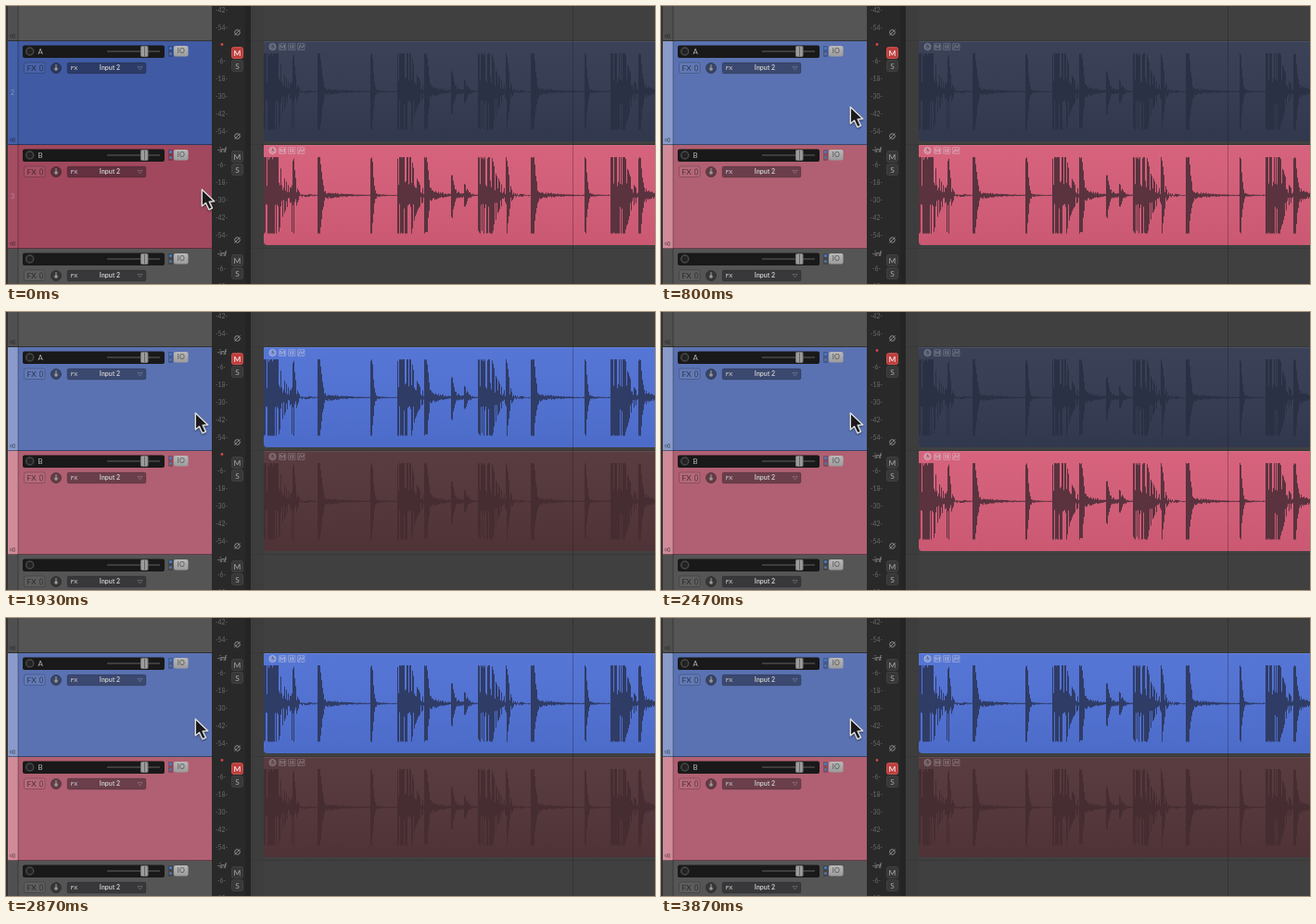
Animation, 700 px wide and 300 px high, one loop 4070 ms. Source, as an HTML page with a canvas:

```html
<!DOCTYPE html>
<html lang="en">
<head>
<meta charset="utf-8">
<title>Track mute toggle</title>
<style>
  html, body { margin: 0; width: 100%; height: 100%; overflow: hidden; background: #404040; }
  canvas { display: block; width: 700px; height: 300px; }
</style>
</head>
<body>
<canvas id="stage" width="700" height="300"></canvas>
<script>
const ctx = document.getElementById('stage').getContext('2d');
const LOOP = 4070;
const ROW = 112;

// time, item heard, muted button lit
const STATES = [
  [0, 'B', 'A'], [1930, 'A', 'A'], [2000, 'A', 'B'], [2470, 'B', 'A'],
  [2870, 'A', 'B'], [3400, 'B', 'A'], [3870, 'A', 'B']
];

const TRACKS = [
  { name: '', top: -74, body: '#555555', strip: '#505050' },
  { name: 'A', num: '2', top: 38, selectAt: 730,
    body: '#405ba3', strip: '#4460a8', bodyOn: '#5a72b2', stripOn: '#8a9bcb',
    item: '#5071d4', wave: '#2f3c66', itemOff: '#343b51', waveOff: '#2b3145' },
  { name: 'B', num: '3', top: 150, selectAt: 200,
    body: '#a1485e', strip: '#a54e63', bodyOn: '#b06072', stripOn: '#d08b99',
    item: '#d55d78', wave: '#5a333f', itemOff: '#533539', waveOff: '#462d31' },
  { name: '', top: 262, body: '#555555', strip: '#505050' }
];

// offset in the bar, hold, decay, height, dense (low swings with gaps)
const HITS = [
  [0, 15, 8, 42, 1], [0, 10, 16, 14, 1], [30, 2, 2.5, 40, 1],
  [57.5, 3, 2.6, 47, 0], [57.5, 2, 24, 6, 0],
  [115, 1.5, 1.8, 46, 0], [115, 1, 10, 4, 0],
  [143.5, 15, 7, 44, 1], [143.5, 15, 14, 12, 1],
  [173, 2.5, 2.6, 46, 0], [173, 3, 13, 11, 0],
  [201.5, 1.5, 3.2, 24, 0], [201.5, 1, 12, 7, 0], [215.5, 1.5, 4, 13, 0]
];
const BAR = 230.5;
const CLIP = 41.2;

function noise(n) {
  const v = Math.sin(n * 127.1 + 11.7) * 43758.5453;
  return v - Math.floor(v);
}

function waveColumn(px) {
  const pos = px % BAR;
  let best = 0.7, dense = 0, age = 0;
  for (const [start, hold, decay, height, gaps] of HITS) {
    const d = pos - start;
    if (d < 0) continue;
    const level = height * Math.exp(-Math.max(0, d - hold) / decay);
    if (level > best) { best = level; dense = gaps; age = d; }
  }
  const gapChance = 0.15 + 0.4 * Math.min(1, age / 24);
  const swing = seed => {
    const r = noise(px + seed);
    if (dense) return best * (r < gapChance ? 0.2 + 0.5 * r : 0.85 + 0.25 * r);
    return best * (best < 12 ? 0.4 + 0.6 * r : 0.85 + 0.2 * r);
  };
  return [Math.min(CLIP, swing(0)), Math.min(CLIP, swing(500))];
}
const WAVE = Array.from({ length: 422 }, (_, i) => waveColumn(i));

function rect(x, y, w, h, fill) {
  ctx.fillStyle = fill;
  ctx.fillRect(x, y, w, h);
}

function box(x, y, w, h, r, fill, stroke) {
  ctx.beginPath();
  ctx.roundRect(x, y, w, h, r);
  if (fill) { ctx.fillStyle = fill; ctx.fill(); }
  if (stroke) { ctx.strokeStyle = stroke; ctx.lineWidth = 1; ctx.stroke(); }
}

function disc(x, y, r, fill, stroke, width = 1) {
  ctx.beginPath();
  ctx.arc(x, y, r, 0, 7);
  if (fill) { ctx.fillStyle = fill; ctx.fill(); }
  if (stroke) { ctx.strokeStyle = stroke; ctx.lineWidth = width; ctx.stroke(); }
}

function poly(points, fill, stroke, width = 1, closed = true) {
  ctx.beginPath();
  points.forEach(([x, y]) => ctx.lineTo(x, y));
  if (closed) ctx.closePath();
  if (fill) { ctx.fillStyle = fill; ctx.fill(); }
  if (stroke) { ctx.strokeStyle = stroke; ctx.lineWidth = width; ctx.stroke(); }
}

function fade(y, h, from, to) {
  const g = ctx.createLinearGradient(0, y, 0, y + h);
  g.addColorStop(0, from);
  g.addColorStop(1, to);
  return g;
}

function text(str, x, y, size, fill, align = 'center', weight = 400) {
  ctx.font = `${weight} ${size}px Lato, sans-serif`;
  ctx.textAlign = align;
  ctx.textBaseline = 'middle';
  ctx.fillStyle = fill;
  ctx.fillText(str, x, y);
}

function nameBar(track, y) {
  box(18, y + 4.5, 153, 13.5, 2, '#191919');
  disc(25.7, y + 11, 4, '#232323', '#484848', 1.5);
  text(track.name, 34.5, y + 11.5, 7.8, '#b8b8b8', 'left');
  rect(109, y + 10.5, 57, 1, '#626262');
  box(145.5, y + 5.5, 7.5, 11, 1, '#9c9c9c', '#777');
  rect(149, y + 6, 1, 10, '#666');
  box(175, y + 5, 5, 12, 1, 'rgba(25,30,45,.3)');
  disc(177.5, y + 7.5, 1.6, '#3f7fd0');
  disc(177.5, y + 13.5, 1.6, '#55739c');
  box(181, y + 5, 15.5, 11.5, 2, fade(y + 5, 12, '#b8b8b8', '#9a9a9a'));
  text('IO', 188.8, y + 11, 7.3, '#505050');
}

function fxRow(y) {
  box(19.5, y + 23, 22.5, 11.5, 2, 'rgba(255,255,255,.05)', 'rgba(0,0,0,.2)');
  text('FX', 27.5, y + 29.2, 8.4, 'rgba(0,0,0,.55)');
  box(36.5, y + 25.7, 3, 6.3, 1.5, null, 'rgba(0,0,0,.35)');
  disc(54, y + 29, 5.5, 'rgba(25,25,25,.5)', 'rgba(20,20,20,.4)');
  disc(54, y + 30, 1.8, '#999');
  rect(53.5, y + 25, 1, 4, '#999');
  box(66, y + 23, 85, 12, 2, 'rgba(20,20,25,.44)', 'rgba(0,0,0,.14)');
  text('FX', 73.5, y + 29.2, 6, '#b5b5b5', 'center', 700);
  text('Input 2', 112, y + 29.2, 7, '#c6c6c6', 'center', 700);
  poly([[142, y + 27.5], [147, y + 27.5], [144.5, y + 31]], null, 'rgba(190,190,190,.35)', 0.8);
}

function panel(track, t) {
  const y = track.top;
  const on = track.selectAt !== undefined && t >= track.selectAt;
  rect(2, y, 220, ROW, on ? track.bodyOn : track.body);
  rect(2, y, 11, ROW, on ? track.stripOn : track.strip);
  rect(12.5, y, 1, ROW, 'rgba(0,0,0,.3)');
  rect(2, y + ROW - 1, 220, 1, 'rgba(0,0,0,.4)');
  if (track.num && !on) text(track.num, 7, y + 56, 7, 'rgba(205,205,205,.5)');
  disc(5.5, y + 106.5, 1.3, null, 'rgba(20,20,20,.45)', 0.8);
  box(7.5, y + 104.5, 2, 4, 0.5, null, 'rgba(20,20,20,.35)');
  nameBar(track, y);
  fxRow(y);
}

function button(label, y, lit) {
  box(243.5, y - 6, 12, 12, 2, lit ? '#bd3f3d' : '#383838', lit ? '#c9524d' : '#414141');
  text(label, 249.5, y + 0.6, 8.4, lit ? '#f4dcdc' : '#a8a8a8', 'center', lit ? 700 : 400);
}

function meter(track, silent, lit) {
  const y = track.top;
  if (silent) disc(233, y + 3.5, 1.4, '#d2464c');
  else text('-inf', 233, y + 6.3, 7, '#a8a8a8');
  ['-6-', '-18-', '-30-', '-42-', '-54-'].forEach((label, i) =>
    text(label, 232.5, y + 21.5 + i * 19.2, 6.8, '#6c6c6c'));
  button('M', y + 12.5, lit);
  button('S', y + 26.5, false);
  disc(249.5, y + 102.5, 2.8, null, '#929292');
  poly([[246.5, y + 105.5], [252.5, y + 99.5]], null, '#929292', 0.9, false);
}

function itemIcons(y, alpha) {
  const line = `rgba(225,225,230,${alpha})`;
  const soft = `rgba(205,205,212,${alpha * 0.6})`;
  disc(287.5, y + 6, 3.6, soft, line, 0.8);
  poly([[287.5, y + 3.5], [287.5, y + 6], [289.5, y + 6]], null, 'rgba(40,40,50,.5)', 0.8, false);
  [294.5, 304.5, 314.5].forEach(x => box(x, y + 2.5, 7.5, 7, 0.5, `rgba(210,210,220,${alpha * 0.2})`, soft));
  poly([[296, y + 8.5], [296, y + 4], [298.2, y + 7], [300.5, y + 4], [300.5, y + 8.5]], null, line, 0.8, false);
  rect(306.5, y + 4, 1, 4, line);
  rect(309, y + 4, 1, 4, line);
  poly([[315.5, y + 8.5], [317.5, y + 4.5], [319.5, y + 7], [321.5, y + 4]], null, line, 0.8, false);
}

function clip(track, heard) {
  const y = track.top, mid = y + 54.3;
  const shape = [278, y, 430, 108, [1, 0, 0, 4]];
  box(...shape, heard ? track.item : track.itemOff);
  box(...shape, fade(y, 108, 'rgba(255,255,255,.035)', 'rgba(0,0,0,.05)'));
  rect(278, y, 422, 1, 'rgba(255,255,255,.08)');
  ctx.fillStyle = heard ? track.wave : track.waveOff;
  WAVE.forEach(([up, down], i) => ctx.fillRect(278 + i, mid - up, 1, up + down));
  itemIcons(y, heard ? 0.6 : 0.36);
}

function pointer(t) {
  let p = 0;
  if (t >= 200) {
    const step = Math.min(7, Math.floor((t - 200) / 67));
    const u = (step + 0.5) / 7.5;
    p = u * u * (3 - 2 * u);
  }
  const x = 211.3 - 7 * p, y = 198 - 89 * p;
  const shape = [[0, 0], [0, 18], [4.2, 14.5], [7.6, 21.8], [11.2, 20.1], [7.9, 13.2], [13.4, 12.8]]
    .map(([dx, dy]) => [x + dx, y + dy]);
  ctx.save();
  ctx.shadowColor = 'rgba(0,0,0,.4)';
  ctx.shadowBlur = 2;
  ctx.shadowOffsetY = 1;
  ctx.lineJoin = 'round';
  poly(shape, '#1c1c1c', '#dedede', 1.5);
  ctx.restore();
}

function draw(t) {
  const [, heard, lit] = STATES.filter(s => s[0] <= t).pop();
  rect(0, 0, 700, 300, '#404040');
  rect(0, 0, 2, 300, '#343434');
  rect(222, 0, 42, 300, '#292929');
  rect(258, 0, 6, 300, '#242424');
  rect(264, 0, 14, 300, '#3d3d3d');
  for (const track of TRACKS) {
    rect(264, track.top + ROW - 1, 436, 1, '#383838');
    panel(track, t);
    meter(track, track.item && track.name !== heard, track.name !== '' && track.name === lit);
    if (track.item) clip(track, track.name === heard);
  }
  rect(611, 0, 1, 300, 'rgba(25,25,25,.3)');
  pointer(t);
}

const begin = performance.now();
function tick(now) {
  draw(Math.max(0, now - begin) % LOOP);
  requestAnimationFrame(tick);
}
draw(0);
requestAnimationFrame(tick);
</script>
</body>
</html>
```
